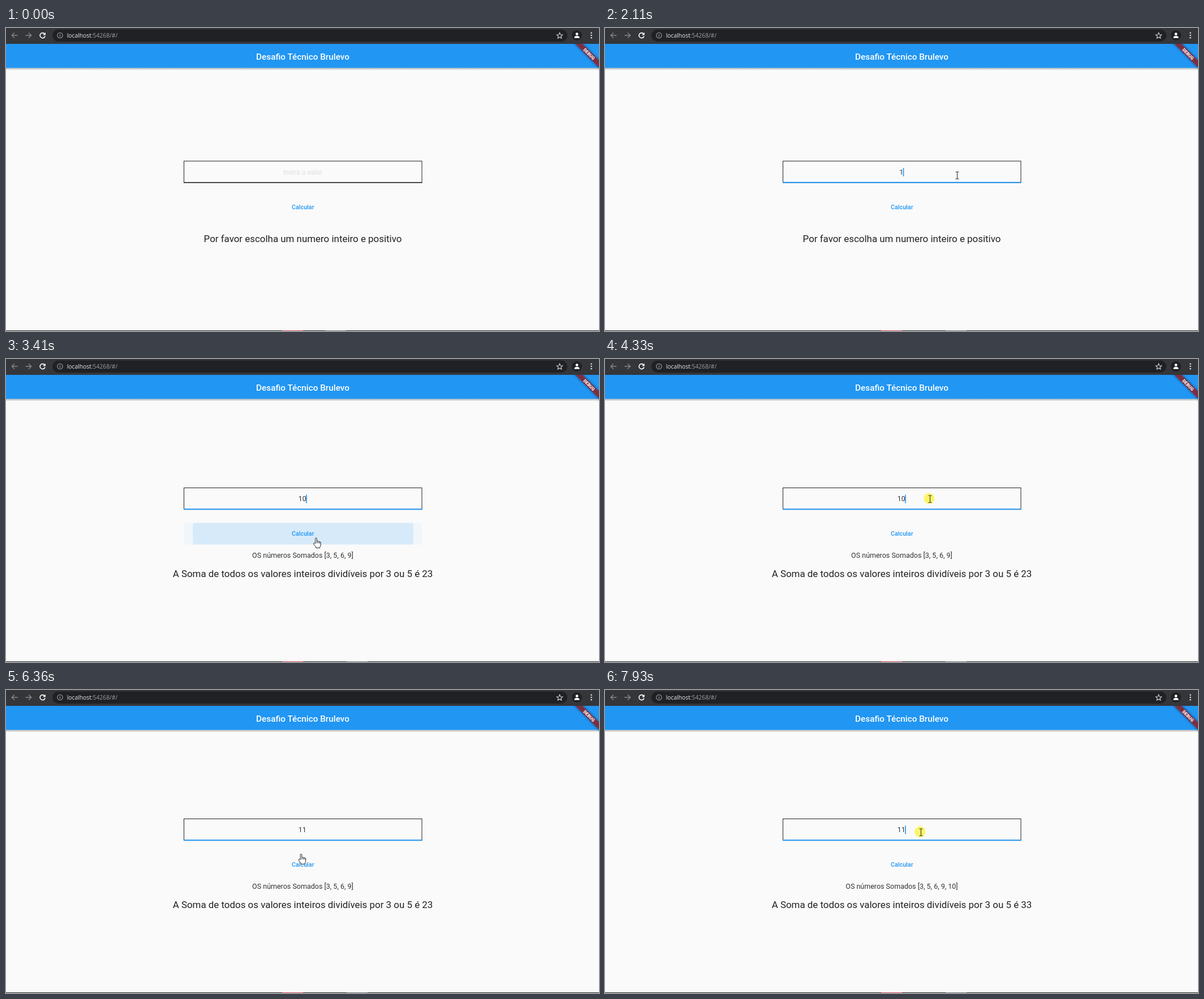
An HTML page that plays this animation: 1048x535 px, repeating every 8000 ms.

```html
<!DOCTYPE html>
<html lang="pt">
<head>
<meta charset="utf-8">
<title>Soma</title>
<style>
html, body { margin: 0; height: 100%; overflow: hidden; background: #fafafa; }
svg { display: block; width: 100%; height: 100%; }
text { font-family: Roboto, sans-serif; text-anchor: middle; }
.url { font: 10.3px "Open Sans", sans-serif; text-anchor: start; }
.field { font-size: 12.27px; }
.line { fill: none; stroke-width: 1.3; }
</style>
</head>
<body>
<svg viewBox="0 0 1048 535">
  <defs>
    <linearGradient id="shade" x2="0" y2="1">
      <stop stop-opacity=".3"/><stop offset="1" stop-opacity="0"/>
    </linearGradient>
    <filter id="blur" x="-20%" y="-80%" width="140%" height="260%"><feGaussianBlur stdDeviation="2.5"/></filter>
    <clipPath id="page"><path d="M0 28H1048V535H0z"/></clipPath>
    <clipPath id="button"><path d="M314.5 289.5H735V327.5H314.5z"/></clipPath>
  </defs>

  <!-- browser bar -->
  <path fill="#35363a" d="M0 0H1048V28H0z"/>
  <rect x="82" y="2.5" width="910" height="21.5" rx="10.7" fill="#202124"/>
  <g class="line" stroke="#87888b">
    <path d="M20.5 13H10.5M15 8.2L10.2 13L15 17.8"/>
    <path d="M34.5 13H44.5M40 8.2L44.8 13L40 17.8"/>
    <circle cx="95.5" cy="13" r="4.7" stroke-width="1.1" stroke="#9aa0a6"/>
    <path d="M95.5 12.2V15.6M95.5 10.2V11.3" stroke="#9aa0a6"/>
  </g>
  <path class="line" stroke="#fff" style="stroke-width:1.6" d="M68.2 10.4A4.5 4.5 0 1 0 69 14.2"/>
  <path fill="#fff" d="M69.8 7.8V12.4H65.2z"/>
  <text class="url" x="107.7" y="16.9" fill="#e8eaed">localhost<tspan fill="#9aa0a6">:54268/#/</tspan></text>
  <path class="line" stroke="#d0d2d5" style="stroke-width:1.1" d="M978.5 8.2L980 11.7L983.7 12L980.9 14.5L981.8 18.1L978.5 16.2L975.2 18.1L976.1 14.5L973.3 12L977 11.7z"/>
  <circle cx="1009" cy="13" r="9" fill="#202124"/>
  <path fill="#fff" d="M1004.5 17.8V16.6C1004.5 14.6 1007 14 1009 14S1013.5 14.6 1013.5 16.6V17.8z"/>
  <circle cx="1009" cy="10.7" r="2.4" fill="#fff"/>
  <g fill="#dfe1e5"><circle cx="1034.5" cy="8.8" r="1.3"/><circle cx="1034.5" cy="13" r="1.3"/><circle cx="1034.5" cy="17.2" r="1.3"/></g>

  <!-- app bar -->
  <path fill="url(#shade)" d="M0 70.5H1048V74.5H0z"/>
  <path fill="#2196f3" d="M0 28H1048V70.5H0z"/>
  <text x="524.5" y="55.5" font-size="15.3" font-weight="500" fill="#fff">Desafio Técnico Brulevo</text>
  <g clip-path="url(#page)">
    <g transform="translate(1049 27.5) rotate(45) scale(.767)">
      <path d="M-46 28H46V40H-46z" opacity=".5" filter="url(#blur)"/>
      <path d="M-46 28H46V40H-46z" fill="#b71c1c" fill-opacity=".63"/>
      <text y="37.6" font-size="10.2" font-weight="900" fill="#fff">DEBUG</text>
    </g>
  </g>

  <!-- form -->
  <g id="form">
    <g clip-path="url(#button)" fill="#2196f3">
      <path id="hover" d="M314 289H736V328H314z" fill-opacity=".045"/>
      <circle id="ripple" cx="525" cy="308.5"/>
    </g>
    <rect x="314.5" y="227.5" width="420.5" height="38" fill="none" stroke="#333" stroke-width="1.1"/>
    <path id="underline" d="M314 265.3H735.5"/>
    <path id="select" fill="#a3d1f7" d="M0 239H1V255H0z"/>
    <text id="value" class="field" y="251.2"></text>
    <path id="caret" fill="#2196f3" d="M-.8 239.5H.8V254.5H-.8z"/>
    <text x="524.7" y="312.2" font-size="10.74" font-weight="500" fill="#2196f3">Calcular</text>
  </g>
  <text id="summed" x="524.5" y="350.7" font-size="12.5" fill="#333"></text>
  <text id="result" x="524.5" font-size="16.92" fill="#222"></text>

  <!-- top edge of the taskbar -->
  <path fill="#1d1d1f" d="M0 534H1048V535H0z"/>
  <path fill="#c9404c" d="M488 534H525V535H488z"/>
  <path id="task" fill="#66686c" d="M0 534H37V535H0z"/>

  <!-- pointer -->
  <g id="pointer">
    <circle id="press" cx="-1.7" cy="-.6" r="9.6" fill="#fdf66b"/>
    <g id="beam" fill="none"><path d="M-3 -6H-1L0 -5L1 -6H3M0 -5V5.5M-3 6.5H-1L0 5.5L1 6.5H3" stroke="#333" stroke-width="1.1"/></g>
    <path id="arrow" fill="#fff" stroke="#222" stroke-width=".9" d="M0 0V14.5L3.4 11.4L5.8 17L8 16L5.7 10.6H10.3z"/>
    <path id="hand" fill="#fff" stroke="#222" stroke-width="1" stroke-linejoin="round" d="M-1.3 10V1.2Q-1.2 -.2 0 -.2T1.4 1.2V6Q2.6 5 4 6.3Q5.2 5.5 6.4 6.9Q8 6.4 8.2 8.4V12Q8 14.5 6.8 15.6V17.6H-.2V16Q-2.2 13.8 -4.4 10.8Q-4.8 9 -3.4 8.8Q-2.2 9 -1.3 10M1.4 6V9.4M4 6.5V9.6M6.4 7V9.8"/>
  </g>
</svg>
<script>
const LOOP = 8000, BLUE = '#2196f3';
const $ = id => document.getElementById(id);
const set = (id, attrs) => { for (const k in attrs) $(id).setAttribute(k, attrs[k]); };
const show = (id, on) => set(id, { visibility: on ? 'visible' : 'hidden' });
const clamp = v => Math.max(0, Math.min(1, v));
const within = (t, a, b) => t >= a && t < b;

// pointer path: time, x, y
const path = [
  [70, 930, 477], [200, 917, 452], [330, 899, 418], [430, 866, 386], [530, 791, 345],
  [630, 721, 314], [730, 670, 290], [830, 640, 272.5], [970, 624, 261], [1050, 622.5, 260],
  [2650, 622.5, 260], [2780, 592, 292], [2920, 555, 314], [3150, 548, 316], [3500, 548, 316],
  [3800, 553, 280], [4100, 574.5, 247], [4400, 574.5, 247], [4820, 520, 249.5],
  [4900, 512, 250], [5030, 502, 250], [6030, 502, 250], [6480, 528.5, 304],
  [6960, 528.5, 304], [7250, 553, 277], [7560, 565, 251], [7720, 565, 251],
  [7930, 558.5, 251], [8000, 555, 251]
];
const presses = [[1000, 1180], [4330, 4900], [7720, 8000]];
const clicks = [{ at: 3270, end: 3560, fade: 240 }, { at: 6640, end: 6825, fade: 1 }];

function pointerAt(t) {
  const i = Math.max(1, path.findIndex(p => p[0] > t));
  const [a, b] = [path[i - 1], path[i]];
  const k = clamp((t - a[0]) / (b[0] - a[0]));
  return [a[1] + (b[1] - a[1]) * k, a[2] + (b[2] - a[2]) * k];
}

function typed(t) {
  if (t < 2110) return '';
  if (t < 2250) return '1';
  if (t < 5500) return '10';
  return t < 5630 ? '1' : '11';
}

// the caret blinks every half second, restarting at each edit
function caretOn(t) {
  if (t < 1320 || within(t, 1710, 2110)) return false;
  if (t < 2110) return true;
  if (within(t, 4330, 5500)) return t < 4640;
  const start = t < 5500 ? 2190 : 5630;
  return t < start || Math.floor((t - start) / 500) % 2 === 0;
}

function draw(t) {
  const limit = t < 3340 ? 0 : t < 6700 ? 10 : 11;
  const shift = limit ? 0 : 7.5;
  const [x, y] = pointerAt(t);

  set('form', { transform: `translate(0 ${shift})` });
  set('underline', t < 1320 ? { stroke: '#333', 'stroke-width': 1.5 } : { stroke: BLUE, 'stroke-width': 2 });

  const value = typed(t);
  $('value').textContent = value || 'Insira o valor';
  set('value', value ? { x: 523.7, fill: '#333' } : { x: 524.5, fill: '#dedede' });
  const end = 523.8 + value.length * 3.5;
  set('caret', { transform: `translate(${end + (value ? .2 : 0)} 0)` });
  show('caret', caretOn(t));

  const from = x < 519 ? 516.5 : x < 527 ? 523.6 : 530.5;
  show('select', within(t, 4400, 5500) && from < 530);
  set('select', { transform: `translate(${from} 0) scale(${530.5 - from} 1)` });

  const nums = [...Array(limit).keys()].filter(n => n && (n % 3 === 0 || n % 5 === 0));
  if (limit === 11 && !nums.includes(10)) nums.push(10);
  const total = nums.reduce((a, b) => a + b, 0);
  $('summed').textContent = limit ? `OS números Somados [${nums.join(', ')}]` : '';
  $('result').textContent = limit
    ? `A Soma de todos os valores inteiros dividíveis por 3 ou 5 é ${total}`
    : 'Por favor escolha um numero inteiro e positivo';
  set('result', { y: limit ? 384.8 : 377.8 });

  show('hover', within(t, 2950, 3780) || within(t, 6400, 6825));
  const click = clicks.find(c => within(t, c.at, c.end + c.fade));
  show('ripple', click);
  if (click) {
    const left = 1 - clamp((t - click.at) / 210);
    set('ripple', {
      r: 63 + 148 * (1 - left * left),
      'fill-opacity': .125 * clamp((t - click.at) / 75) * (1 - clamp((t - click.end) / click.fade))
    });
  }

  const inField = within(x, 314, 735) && within(y, 227 + shift, 266 + shift);
  const inButton = within(x, 314, 735) && within(y, 289 + shift, 328 + shift);
  const seen = t >= 70;
  set('pointer', { transform: `translate(${x} ${y})` });
  show('beam', seen && inField);
  show('hand', seen && inButton);
  show('arrow', seen && !inField && !inButton);
  show('press', presses.some(([a, b]) => within(t, a, b)));
  set('task', { transform: `translate(${t < 1180 ? 564 : 602} 0)` });
}

function tick() {
  draw(performance.now() % LOOP);
  requestAnimationFrame(tick);
}
tick();
</script>
</body>
</html>
```
